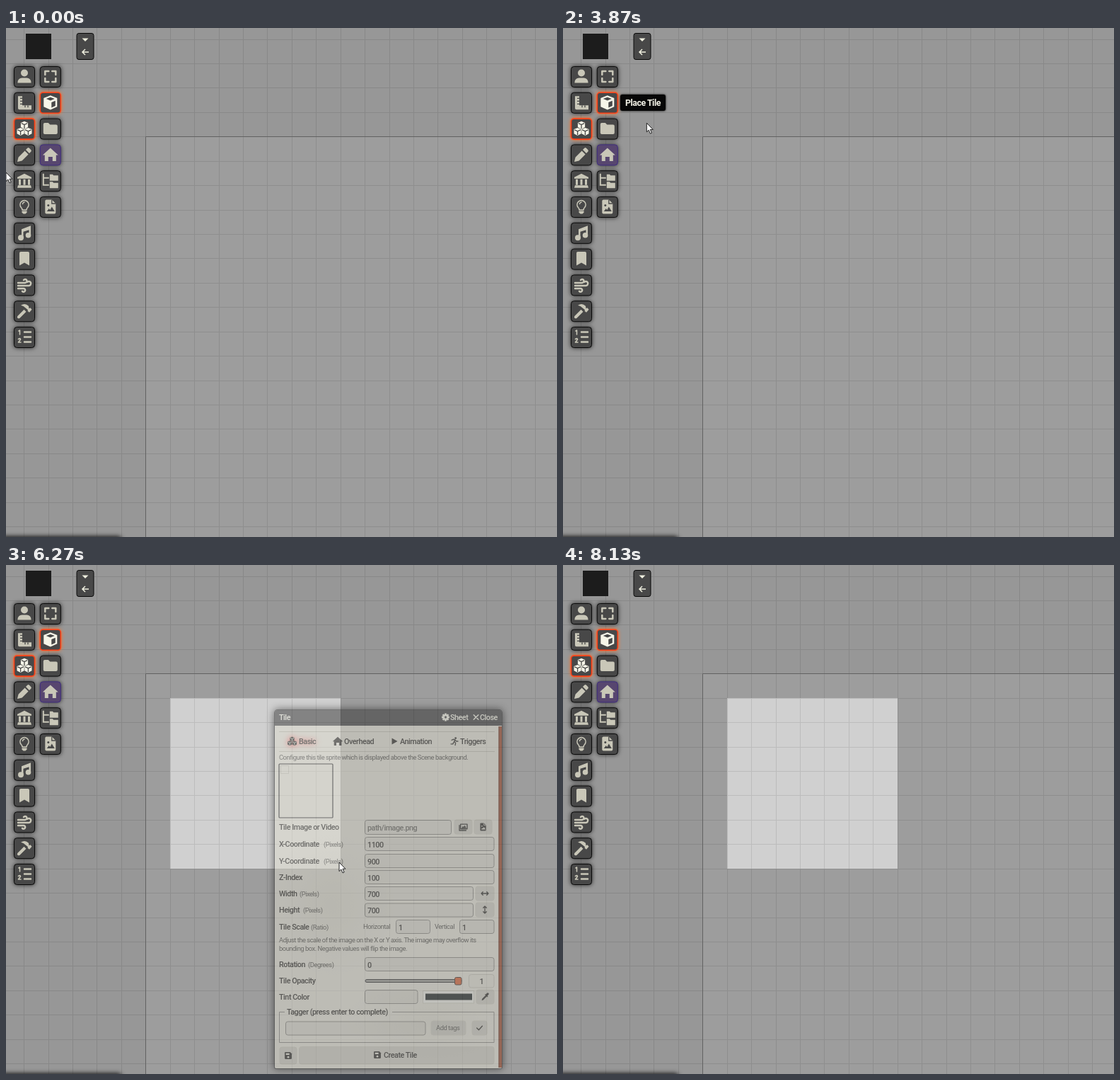
Animation, 779 px wide and 719 px high, one loop 9.07 s. Source, as an HTML page:

```html
<!DOCTYPE html>
<html lang="en">
<head>
<meta charset="utf-8">
<title>Placing a tile</title>
<style>
html, body { margin: 0; width: 100%; height: 100%; overflow: hidden; background: #979797; }
body { position: relative; font-family: Roboto, Arial, sans-serif; letter-spacing: -.03em; }
svg { position: absolute; left: 0; top: 0; width: 779px; height: 719px; }
.button { fill: #484848; stroke: #090909; }
.tool { filter: drop-shadow(0 0 3px rgba(0, 0, 0, .75)); }
.active { stroke: #ff4218; stroke-width: 1.6; filter: drop-shadow(0 0 2.5px #ff6a1c); }
.purple { fill: #57466f; stroke: #3f2c80; }
.icon { fill: #c9c7b8; }
.line { fill: none; stroke: #c9c7b8; stroke-width: 2.5; stroke-linecap: round; stroke-linejoin: round; }
.thin { stroke-width: 1.6; }
.bright .icon { fill: #f6f5e8; }
.cut { fill: none; stroke: #484848; stroke-width: 1.3; }
.hole { fill: #484848; }
.tooltip { position: absolute; height: 23px; padding: 0 7px; line-height: 23px; border-radius: 3px;
  background: #070707; color: #f3f2e6; box-shadow: 0 0 3px #000; font-size: 12.4px; font-weight: 700; white-space: nowrap; }
#dialog { position: absolute; left: 380px; top: 205px; width: 321px; overflow: hidden;
  border-radius: 4px 4px 2px 2px; box-shadow: 0 0 0 1px #222, 0 0 12px 1px #000; }
#dialog svg { left: -380px; top: -205px; font-size: 10.8px; font-weight: 500; }
#dialog .small { font-size: 9.4px; font-weight: 400; fill: #3f3e38; }
#dialog .title { fill: #f0f0e0; }
#dialog .glow { filter: drop-shadow(0 0 4px rgba(255, 0, 0, .75)); }
#dialog .icon { fill: #191813; }
#dialog .line { stroke: #191813; }
#dialog .cut { stroke: #dcdacd; }
#dialog .hole { fill: #dcdacd; }
#dialog .title .icon { fill: #f0f0e0; }
#dialog .title .line { stroke: #f0f0e0; }
#dialog .title .hole { fill: #3a3a3a; }
.field { fill: rgba(0, 0, 0, .05); stroke: #7a7971; }
.key { fill: rgba(0, 0, 0, .1); stroke: #c2c0b1; }
.output { fill: rgba(0, 0, 0, .02); stroke: #b9b7a9; }
.frame { fill: none; stroke: #7a7971; }
</style>
</head>
<body>
<svg id="stage"></svg>
<div class="tooltip" id="controlsTip" style="left:44px;top:131px">Tile Controls</div>
<div class="tooltip" id="placeTip" style="left:81px;top:94px">Place Tile</div>
<div id="dialog"><svg id="form"></svg></div>
<svg>
  <g id="cursor" fill="#fff" stroke="#111" stroke-width=".9" stroke-linejoin="round">
    <path id="arrow" d="M0 0v12.6l2.9-2.7 2.1 5 2.1-.9-2.1-4.8h3.9z"/>
    <path id="hand" d="M-1.5 1.5a1.5 1.5 0 0 1 3 0v4.8l5.6 1.2q1.6.4 1.4 2.2l-.7 4.8-1.2 3.4h-7l-4.8-6.4q-.8-1.5.5-2t3.2 1.8z"/>
  </g>
</svg>
<script>
const LOOP = 9070, CELL = 34.43, LEFT = 197.3, TOP = 153.3;
const $ = id => document.getElementById(id);

// Markup helpers; icons are drawn around 0,0 in a box of about 20 units.
const path = (d, cls = 'icon') => `<path class="${cls}" d="${d}"/>`;
const rect = (x, y, w, h, cls, r = 3) => `<rect x="${x}" y="${y}" width="${w}" height="${h}" rx="${r}" class="${cls}"/>`;
const text = (x, y, s, cls = '') => `<text x="${x}" y="${y}" class="${cls}">${s}</text>`;
const place = (x, y, s, scale = 1, cls = '') => `<g class="${cls}" transform="translate(${x} ${y}) scale(${scale})">${s}</g>`;
const dot = (x, y, r, cls = 'icon') => `<circle cx="${x}" cy="${y}" r="${r}" class="${cls}"/>`;

function smallCube(x, y) {
  return place(x, y, path('M0-5.6l5.1 2.2v6.2L0 5.6l-5.1-2.8v-6.2z') + path('M-4.2-2.6L0-.7l4.2-1.9M0-.7v5.5', 'cut'));
}

const icons = {
  user: dot(0, -5, 5) + path('M-9.5 9V8a6 6 0 0 1 6-6h7a6 6 0 0 1 6 6v1z'),
  ruler: path('M-9-9h6v13h13v6h-17a2 2 0 0 1-2-2z') + path('M-3-6h-3M-3-2h-3M-3 2h-3M1 4v3M5 4v3', 'cut'),
  cubes: smallCube(0, -4.8) + smallCube(-5.4, 4.4) + smallCube(5.4, 4.4),
  pencil: path('M-10 10l1.6-6.5 9-9 5 5-9 9zM2-7l2.2-2.2a2 2 0 0 1 2.8 0l2.2 2.2a2 2 0 0 1 0 2.8L7-2z'),
  museum: path('M0-10l10 5v2h-20v-2zM-8-2h3v8h-3zM-1.5-2h3v8h-3zM5-2h3v8h-3zM-9 6.5h18l1 3.5h-20z'),
  bulb: path('M-3 4.5q0-2-1.8-3.8a6 6 0 1 1 9.6 0Q3 2.5 3 4.5zM-2.5-4a3 3 0 0 1 2.5-2.5', 'line thin') + path('M-3.5 6h7v2l-2 2h-3l-2-2z'),
  music: path('M-4-5L9-10v13h-2.5v-7l-8 2.5V7H-4z') + dot(-5, 7, 4) + dot(5.5, 3.5, 3.8),
  bookmark: path('M-7-8a2 2 0 0 1 2-2h10a2 2 0 0 1 2 2V9.5l-7-4-7 4z'),
  wind: path('M-9-3H1a2.5 2.5 0 1 0-2-4M-9 1H6a3 3 0 1 0-2-5M-9 5h8a2.4 2.4 0 1 1-2 4', 'line'),
  hammer: path('M-9.5 7l9-9 3 3-9 9q-1.5 1.2-3 0t0-3zM-5-8Q1-12 6-7l.5 3.5 2-1 2 2.5-3.5 4-2.5-2 .5-1.5-6-5q-1.5-1-4-1.5z'),
  list: path('M0-7h9M0 0h9M0 7h9', 'line') + path('M-8-8.5l1.5-1v6M-8.5 3q3-2 3 .5l-3 4h3.5', 'line thin'),
  expand: path('M-7.5-2.5v-5h5M2.5-7.5h5v5M7.5 2.5v5h-5M-2.5 7.5h-5v-5', 'line'),
  cube: path('M0-10l9.5 3.6V6L0 10.3-9.5 6V-6.4z') + path('M0-7.5l6 2.3-6 2.3-6-2.3zM1.5-.4L7-2.6v7.2L1.5 7.1z', 'hole'),
  folder: path('M-10-6a2 2 0 0 1 2-2h5l2.5 2.5H8a2 2 0 0 1 2 2V6a2 2 0 0 1-2 2H-8a2 2 0 0 1-2-2z'),
  home: path('M0-9.5L11 .5H8V9H3V3h-6v6h-5V.5h-3z'),
  tree: path('M-11-10h2v5h7v2h-7v8h7v2h-9zM-1-9h4l1.5 1.5H11V0H-1zM-1 1.5h4L4.5 3H11v7.5H-1z'),
  file: path('M-7.5-8a2 2 0 0 1 2-2H2l5.5 5.5V8a2 2 0 0 1-2 2h-11a2 2 0 0 1-2-2z') +
    path('M-5 6.5l3-4 1.5 2L2 0l4 6.5z', 'hole') + dot(-3, -2, 1.5, 'hole') + path('M2-10v5.5h5.5', 'cut'),
  gear: [0, 45, 90, 135].map(a => `<rect class="icon" x="-2.5" y="-10" width="5" height="20" transform="rotate(${a})"/>`).join('') +
    dot(0, 0, 7) + dot(0, 0, 3, 'hole'),
  cross: path('M-6-6L6 6M6-6L-6 6', 'line'),
  play: path('M-7-9L9 0-7 9z'),
  runner: dot(3, -8, 2.6) + path('M-7-3l4-2 5 1-3 5 4 3-1 6M-2 3l-2 4h-5M3-2l2 2h4', 'line'),
  photos: path('M-7-7H10V5H-7zM-10-4v13H7', 'line') + path('M-5 3l4-5 2 2 3-4 4 7z'),
  wide: path('M-9 0H9M-5-4l-4 4 4 4M5-4l4 4-4 4', 'line'),
  dropper: path('M-9 9l1-4L1-4l3 3-9 9zM-1-6l7 7 1.5-1.5-2-2 3-3a2.5 2.5 0 0 0-4-4l-3 3-1-1z'),
  check: path('M-7 0l5 5L7-5', 'line'),
  save: path('M-9-7a2 2 0 0 1 2-2H5l4 4V7a2 2 0 0 1-2 2H-7a2 2 0 0 1-2-2z') + path('M-6-6H3v4h-9z', 'hole') + dot(0, 4, 2.5, 'hole')
};

function toolButton(name, col, row) {
  const x = 26 + col * 36.8, y = 69 + row * 36.8;
  const active = name === 'cube' || name === 'cubes';
  const style = active ? 'active' : name === 'home' ? 'purple' : '';
  return rect(x - 14.5, y - 14.5, 29, 29, 'button tool ' + style, 4) + place(x, y - .5, icons[name], 1, active ? 'bright' : '');
}

const toolColumn = (names, col) => names.split(' ').map((name, row) => toolButton(name, col, row)).join('');

function gridLines() {
  let d = '';
  for (let k = -5; k < 18; k++) {
    d += `M${Math.round(LEFT + k * CELL) + .5} 0V719`;
    d += `M0 ${Math.round(TOP + k * CELL) + .5}H779`;
  }
  return d;
}

$('stage').innerHTML =
  `<path fill="#9d9d9d" d="M197 153H779V719H197z"/>
  <rect id="tile" x="232" y="188" fill="#fff" opacity=".52"/>
  <path d="${gridLines()}" stroke="#000" opacity=".09"/>
  <path d="M779 153.5H197.5V719" fill="none" stroke="#626262"/>
  <rect x="-10" y="718" width="174" height="20" rx="6" style="filter:blur(3px)" fill="#111"/>
  <rect x="28" y="8" width="36" height="36" fill="#1c1c1c"/>` +
  rect(100, 7.5, 24, 37, 'button', 3) +
  `<path fill="#f0f0e0" d="M107.5 14.5h9l-4.5 4.5z"/>
  <path fill="none" stroke="#f0f0e0" stroke-width="1.5" d="M117 34h-9M112 30l-4 4 4 4"/>` +
  toolColumn('user ruler cubes pencil museum bulb music bookmark wind hammer list', 0) +
  toolColumn('expand cube folder home tree file', 1);

// A labelled form row with an optional unit and an input of the given width.
function row(label, unit, unitX, y, value, width) {
  return text(386, y, label) + (unit && text(unitX, y, `(${unit})`, 'small')) +
    (width ? rect(507.5, y - 13, width, 19, 'field') + text(511, y + 1, value) : '');
}
const key = (x, y, w, h, icon, scale = .55) => rect(x, y, w, h, 'key') + place(x + w / 2, y + h / 2, icons[icon], scale);

$('form').innerHTML =
  `<defs><radialGradient id="stain"><stop stop-color="#c4c2b3" stop-opacity=".4"/><stop offset="1" stop-color="#c4c2b3" stop-opacity="0"/></radialGradient></defs>
  <path d="M380 205H701V227H380z" fill="#191919" opacity=".82"/>
  <path d="M380 227H701V711H380z" fill="#dcdacd"/>
  <g fill="url(#stain)"><ellipse cx="460" cy="480" rx="90" ry="100"/><ellipse cx="600" cy="645" rx="120" ry="60"/></g>
  <path d="M386 235.5H691M386 263.5H691" stroke="#b6b4a5"/>
  <path d="M696.5 228H701V710H696.5z" fill="#8f3313"/>
  <path d="M697 228V710" stroke="#4a2013"/>` +
  `<g class="title">` + text(386, 219, 'Tile') + place(621.5, 215, icons.gear, .55) + text(628, 219, 'Sheet') +
  place(664.5, 215, icons.cross, .55) + text(670, 219, 'Close') + `</g><g fill="#191813">` +
  `<g class="glow">` + place(404.5, 249, icons.cubes, .62) + text(414, 253, 'Basic') + `</g>` +
  place(469, 249, icons.home, .66) + text(478, 253, 'Overhead') +
  place(549, 249, icons.play, .5) + text(557, 253, 'Animation') +
  place(634, 249, icons.runner, .55) + text(642, 253, 'Triggers') +
  text(386, 275, 'Configure this tile sprite which is displayed above the Scene background.', 'small') +
  `<rect x="386" y="281" width="76" height="76" rx="1" fill="#000" fill-opacity=".02" stroke="#111" stroke-width="1.2"/>
  <rect x="388.5" y="283.5" width="11" height="11" fill="none" stroke="#bdbbae"/>` +
  text(386, 374, 'Tile Image or Video') + rect(507.5, 360.5, 122, 20, 'field') +
  `<text x="511" y="375" fill="#55544d">path/image.png</text>` +
  key(634, 360, 25, 20, 'photos') + key(662, 360, 25, 20, 'file') +
  row('X-Coordinate', 'Pixels', 449, 397.5, '1100', 182.5) +
  row('Y-Coordinate', 'Pixels', 449, 421.5, '900', 182.5) +
  row('Z-Index', '', 0, 444.5, '100', 182.5) +
  row('Width', 'Pixels', 415, 467.5, '700', 153) + key(664, 454, 26, 20, 'wide') +
  row('Height', 'Pixels', 420, 491, '700', 153) +
  rect(664, 477, 26, 20, 'key') + `<g transform="translate(677 487) rotate(90) scale(.55)">${icons.wide}</g>` +
  row('Tile Scale', 'Ratio', 431, 514.5, '', 0) +
  text(505, 514, 'Horizontal', 'small') + rect(551.5, 501.5, 48, 19, 'field') + text(555, 515.5, '1') +
  text(606, 514, 'Vertical', 'small') + rect(641.5, 501.5, 48.5, 19, 'field') + text(645, 515.5, '1') +
  text(386, 533, 'Adjust the scale of the image on the X or Y axis. The image may overflow its', 'small') +
  text(386, 545, 'bounding box. Negative values will flip the image.', 'small') +
  row('Rotation', 'Degrees', 427, 567.5, '0', 182.5) +
  text(386, 591, 'Tile Opacity') +
  `<rect x="508" y="585.5" width="136" height="4" rx="2" fill="#8d8c85" stroke="#161616"/>
  <rect x="634.5" y="582.5" width="9.5" height="10.5" rx="2" fill="#cf4d1d" stroke="#2a1a14"/>` +
  rect(654.5, 578.5, 35.5, 18.5, 'output') + text(669.5, 592, '1') +
  text(386, 614, 'Tint Color') + rect(507.5, 600.5, 74.5, 19, 'field') +
  `<rect x="589.5" y="601.5" width="72" height="17.5" fill="#e3e2d8" stroke="#c2c0b1"/>
  <path fill="#040c0a" d="M593 605.5H659V614.5H593z"/>` + key(665, 600, 25, 20, 'dropper') +
  path('M394 631.5H386.5V674.5H690V631.5H546', 'frame') + text(397, 635, 'Tagger (press enter to complete)') +
  rect(395.5, 645, 197.5, 19, 'field') +
  rect(601, 644, 49, 20, 'key') + text(608, 657, 'Add tags', 'small') + key(659, 644, 21, 20, 'check') +
  key(387, 681, 24, 24, 'save') +
  rect(414.5, 680.5, 275.5, 24.5, 'key') +
  `<rect id="hover" x="414.5" y="680.5" width="275.5" height="24.5" rx="3" fill="none" stroke="#e88077" style="filter:drop-shadow(0 0 2px rgba(255,0,0,.5))"/>` +
  place(525, 692, icons.save, .55) + text(534, 696, 'Create Tile') + `</g>`;

const clamp = v => Math.min(1, Math.max(0, v));
const ramp = (t, from, to) => clamp((t - from) / (to - from));
const swing = p => .5 - Math.cos(Math.PI * p) / 2;

// Position at time t along [time, x, y] points.
function along(points, t) {
  const i = points.findIndex(p => p[0] > t);
  if (i < 1) return points.at(i).slice(1);
  const [a, b] = [points[i - 1], points[i]], p = ramp(t, a[0], b[0]);
  return [1, 2].map(k => a[k] + (b[k] - a[k]) * p);
}

const cursorPath = [
  [60, 0, 204], [210, 4, 150], [340, 9, 113], [600, 22, 141],
  [1850, 22, 141], [2140, 62.5, 106], [3835, 62.5, 106], [3870, 118, 134],
  [4100, 200, 190], [4330, 290, 248], [4730, 236, 192], [4930, 232, 188],
  [5040, 232, 188], [5070, 265, 217], [5200, 369, 305], [5400, 438, 377], [5780, 471, 420],
  [6400, 471, 420], [6740, 485.5, 697], [7520, 485.5, 697], [7800, 300, 702], [8130, 96, 719]
];
// Tile size in half cells.
const dragPath = [[5060, 0, 0], [5200, 5, 4], [5330, 10, 8], [5530, 12.5, 12], [5780, 14, 14]];
const handTimes = [[480, 1870], [2080, 3850], [6720, 7540]];

function draw(t) {
  const [x, y] = along(cursorPath, t);
  const hand = handTimes.some(([from, to]) => t >= from && t < to);
  $('cursor').setAttribute('transform', `translate(${x} ${y})`);
  $('cursor').style.display = t < 8120 ? '' : 'none';
  $('hand').style.display = hand ? '' : 'none';
  $('arrow').style.display = hand ? 'none' : '';

  $('controlsTip').style.opacity = ramp(t, 1060, 1450) - ramp(t, 1880, 2000);
  $('placeTip').style.opacity = ramp(t, 2000, 2260) - ramp(t, 4400, 4900);

  const [w, h] = along(dragPath, t).map(n => Math.round(Math.round(n) * CELL / 2));
  $('tile').setAttribute('width', w);
  $('tile').setAttribute('height', h);

  const closing = swing(ramp(t, 7450, 7660));
  const dialog = $('dialog').style;
  dialog.display = t >= 6180 && closing < 1 ? '' : 'none';
  dialog.opacity = swing(ramp(t, 6170, 6370));
  dialog.height = 506 * (1 - closing) + 'px';
  $('hover').style.opacity = ramp(t, 6690, 6780);
}

function tick() {
  draw(performance.now() % LOOP);
  requestAnimationFrame(tick);
}
tick();
</script>
</body>
</html>
```
